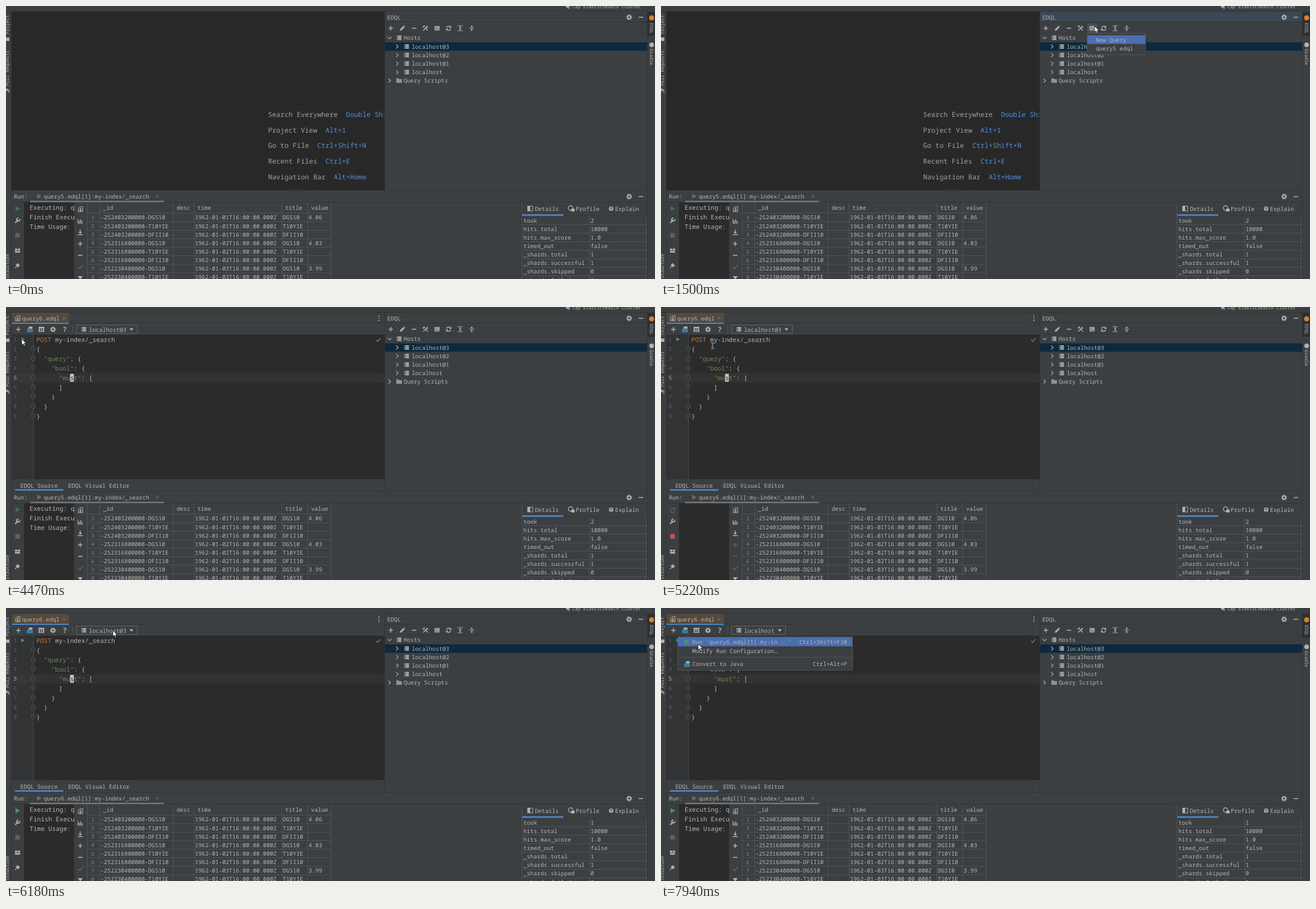
Animation, 1154 px wide and 485 px high, one loop 8000 ms. Source, as an HTML page:

```html
<!DOCTYPE html>
<html lang="en">
<head>
<meta charset="utf-8">
<title>Query console</title>
<style>
html, body { margin: 0; width: 100%; height: 100%; overflow: hidden; background: #3c3f41; }
svg { display: block; }
text { font-family: "Noto Sans Mono", "DejaVu Sans Mono", monospace; text-rendering: geometricPrecision; white-space: pre; }
.layer { animation: 8s step-end infinite; }
#cursor { animation: travel 8s ease-in-out infinite; }
</style>
</head>
<body>
<svg id="stage" width="1154" height="485" viewBox="0 0 1154 485"></svg>
<script>
const LOOP = 8000;
const C = {
  panel: '#3c3f41', edit: '#2b2b2b', line: '#323232', text: '#b4b5b6', icon: '#afb1b3',
  blue: '#4a88c7', pick: '#4b6eaf', grey: '#747a80', green: '#499c54', dim: '#5e6163',
  grid: '#5a5d5f', code: '#a9b7c6', string: '#6a8759', keyword: '#cc7832', link: '#548fe0'
};
const HAIR = .7; // width of table lines
let css = '';

// --- drawing helpers ---
const rect = (x, y, w, h, fill, extra = '') =>
  `<rect x="${x}" y="${y}" width="${w}" height="${h}" fill="${fill}" ${extra}/>`;
const frame = (x, y, w, h, fill, stroke) =>
  rect(x + .5, y + .5, w - 1, h - 1, fill, `stroke="${stroke}"`);
const text = (x, mid, str, fill = C.text, size = 10.1, extra = '') =>
  `<text x="${x}" y="${mid + size * .36}" font-size="${size}" fill="${fill}" ${extra}>${str}</text>`;
const stroke = (d, color = C.icon, width = 1.4) =>
  `<path d="${d}" fill="none" stroke="${color}" stroke-width="${width}"/>`;
const fill = (d, color = C.icon) => `<path d="${d}" fill="${color}"/>`;
const at = (x, y, body) => `<g transform="translate(${x} ${y})">${body}</g>`;
const turned = (x, y, angle, str) =>
  `<text transform="translate(${x} ${y}) rotate(${angle})" font-size="8.1" fill="${C.text}">${str}</text>`;

// Group that is visible only in the given [from, to] spans, in ms.
function layer(id, spans, body) {
  const pct = ms => (ms / LOOP * 100).toFixed(3) + '%';
  const steps = spans[0][0] > 0 ? ['0%{visibility:hidden}'] : [];
  for (const [from, to] of spans) {
    steps.push(`${pct(from)}{visibility:visible}`);
    if (to < LOOP) steps.push(`${pct(to)}{visibility:hidden}`);
  }
  css += `@keyframes ${id}{${steps.join('')}}#${id}{animation-name:${id}}\n`;
  return `<g id="${id}" class="layer">${body}</g>`;
}

// --- icons, centred on 0,0 ---
const icon = {
  plus: (c = C.icon) => stroke('M-4 0H4M0-4V4', c, 1.6),
  minus: (c = C.icon) => stroke('M-4 0H4', c, 1.6),
  play: (c = C.green) => fill('M-3.5-4.5L4.5 0L-3.5 4.5Z', c),
  check: (c = C.dim) => stroke('M-4.5 0L-1.5 3.2L4.5-3.5', c, 1.8),
  close: () => stroke('M-2.5-2.5L2.5 2.5M2.5-2.5L-2.5 2.5', '#7d8083', .9),
  gear: () => `<g fill="none" stroke="${C.icon}"><circle r="2.8" stroke-width="2"/>
    <circle r="4.2" stroke-width="1.8" stroke-dasharray="1.65"/></g>`,
  host: () => rect(-4, -4, 8, 2.3, C.icon) + rect(-4, -1.2, 8, 2.3, C.icon) + rect(-4, 1.6, 8, 2.3, C.icon) +
    stroke('M-2.3-4V4', C.panel, .8),
  right: () => stroke('M-1.7-3.5L1.8 0L-1.7 3.5', C.icon, 1.2),
  down: () => stroke('M-3.5-1.7L0 1.8L3.5-1.7', C.icon, 1.2),
  drop: () => fill('M-3.5-2H3.5L0 2.5Z'),
  folder: () => fill('M-5-4H-1L.5-2.5H5V4H-5Z', '#8e9396'),
  wrench: () => stroke('M-4.2 4.2L1 -1', C.icon, 2.2) + stroke('M3.8-2.8A2.8 2.8 0 1 1 1.5-4.4', C.icon, 1.8),
  tools: () => stroke('M-4 4L3-3M4 4L-1-1', C.icon, 1.7) + stroke('M-4.5-1.5L-1.5-4.5M1.5-3.5L4-1.2', C.icon, 2.3),
  pencil: () => fill('M-4.5 4.5L-4 1.8L1.8-4L4-1.8L-1.8 4Z') + fill('M2.5-4.5L3.3-5L5-3.3L4.5-2.5Z'),
  query: () => rect(-4.5, -4, 9, 8, '#9da2a6') + stroke('M-2.5-2L-.5 0L-2.5 2M.5 2H3', C.panel, 1),
  refresh: () => stroke('M-3.8-1A4 4 0 0 1 3.4-2M3.8 1A4 4 0 0 1-3.4 2', C.icon, 1.5) +
    fill('M4.6-4.5V-.5H.8ZM-4.6 4.5V.5H-.8Z'),
  expand: () => stroke('M-4.5-4.5H4.5M-4.5 4.5H4.5M0-2.5V2.5', C.icon, 1.2) + fill('M-2.3-1L0-3.4L2.3-1ZM-2.3 1L0 3.4L2.3 1Z'),
  collapse: () => stroke('M-4.5 0H4.5M0-5V-2M0 5V2', C.icon, 1.2) + fill('M-2.3-3.5H2.3L0-1ZM-2.3 3.5H2.3L0 1Z'),
  table: () => rect(-5, -4.5, 10, 9, C.icon) +
    stroke('M-4-1.2H4M-4 1.7H4M-1.5-1.5V4M1.5-1.5V4', C.panel, .9),
  file: () => stroke('M-1-4.5H4V4.5H-4V-1.5Z', C.icon, 1) + stroke('M-2.5 0H2.5M-2.5 2.5H2.5M0-3V4', C.icon, 1.1),
  convert: () => rect(-2, -5, 6.5, 4, C.icon) + rect(-5, 0, 10, 5, '#3592c4') + rect(-4, -2, 3, 2, '#3592c4') +
    stroke('M-3 2.5H3', C.panel, 1),
  bars: () => stroke('M-4-3.5V4H4.5', C.icon, 1.2) + stroke('M-1.8 3V-.5M.8 3V-3M3.4 3V0', C.icon, 1.5),
  load: () => stroke('M0-5V1M-4.5 4.3H4.5', C.icon, 1.4) + fill('M-3.2-.8H3.2L0 2.8Z'),
  layout: () => rect(-4.5, -3.5, 4, 3.3, C.icon) + rect(.5, -3.5, 4, 3.3, C.icon) + rect(-4.5, .7, 9, 3, C.icon),
  pin: () => fill('M0-4.5L4.5 0L3 .7L1.2 3.5L-3.5-1.2L-.7-3Z') + stroke('M-1 1L-4.5 4.5', C.icon, 1.3),
  rerun: () => stroke('M3.5-2A4 4 0 1 0 4 1.5', C.dim, 1.5) + fill('M4.8-5V-.5H.5Z', C.dim),
  dots: () => [-4, 0, 4].map(y => `<circle cy="${y}" r="1.1" fill="${C.icon}"/>`).join(''),
  fold: () => `<path d="M-3.2-3.5H3.2V2L0 4.2L-3.2 2Z" fill="${C.edit}" stroke="#606366" stroke-width=".8"/>` +
    stroke('M-1.7 0H1.7', '#707376', .8)
};
const put = (name, x, y, color) => at(x, y, icon[name](color));

// --- window frame ---
function chrome() {
  return rect(0, 0, 1154, 485, C.panel) + rect(0, 9, 1140, 1, C.line) + rect(9, 9, 1, 476, C.line) +
    rect(1140, 9, 1, 476, C.line) + rect(1140, 10, 14, 43, '#2d2f30') +
    rect(996, 0, 6, 3, C.icon) + rect(999, 2, 4, 3, '#3592c4') + text(1007, 1.3, 'Cap Elasticsearch Cluster', C.text, 8.1) +
    turned(5, 50, -90, 'Project') + rect(0, 56, 6, 6, C.icon) +
    turned(5, 142, -90, 'Pull Requests') + stroke('M0 149H5V154M2.5 146.5L0 149L2.5 151.5', C.icon, 1.3) +
    turned(5, 484, -90, 'Structure') +
    '<circle cx="1148" cy="21" r="4.5" fill="#d9822b"/>' + turned(1145, 30, 90, 'EDQL') +
    `<circle cx="1148" cy="69" r="4.2" fill="${C.icon}"/>` + turned(1145, 76, 90, 'Gradle');
}

function welcome() {
  const rows = [['Search Everywhere', 'Double Shift'], ['Project View', 'Alt+1'], ['Go to File', 'Ctrl+Shift+N'],
    ['Recent Files', 'Ctrl+E'], ['Navigation Bar', 'Alt+Home'], ['Drop files here to open', '']];
  return rect(10, 10, 663, 317, '#282828') + rows.map(([name, key], i) => {
    const y = 192.3 + i * 27.9;
    return text(466, y, name, '#a0a2a4', 12.15) + text(466 + (name.length + 2) * 7.29, y, key, C.link, 12.15);
  }).join('');
}

function hosts() {
  const tools = ['plus', 'pencil', 'minus', 'tools', 'query', 'refresh', 'expand', 'collapse'];
  const names = ['localhost@3', 'localhost@2', 'localhost@1', 'localhost'];
  return rect(673, 10, 467, 317, C.panel) + rect(673, 10, 1, 317, C.line) +
    layer('active', [[780, 1600]], rect(674, 10, 466, 18, '#3b4754')) +
    rect(674, 28, 466, 1, C.line) + text(678, 20, 'EDQL') + put('gear', 1108, 20) + put('minus', 1129, 20) +
    layer('toolHover', [[470, 760]], rect(737, 31, 18, 17, '#4c5052', 'rx="2"')) +
    layer('queryHover', [[1130, 1900]], rect(758, 31, 18, 17, '#4c5052', 'rx="2"')) +
    tools.map((name, i) => put(name, 684.3 + i * 20.55, 39.5)).join('') +
    rect(674, 48, 466, 1, '#373a3c') + rect(674, 64.5, 466, 15, '#0d293e') +
    layer('focusRow', [[780, 1400]], rect(674, 64.5, 466, 15, C.pick)) +
    put('down', 682, 56.5) + put('host', 699, 56.5) + text(707, 56.8, 'Hosts') +
    names.map((name, i) => {
      const y = 72 + i * 15.15;
      return put('right', 695.5, y) + put('host', 712.5, y) + text(721.5, y + .3, name);
    }).join('') +
    put('right', 682, 132.5) + put('folder', 699, 132.5) + text(707, 132.8, 'Query Scripts');
}

// --- editor ---
const lineY = n => 57.7 + (n - 1) * 17.02;
const codeX = col => 54 + col * 6.66;

function codeLines() {
  const lines = [[0, ''], [0, '{'], [2, '"query"', ': {'], [4, '"bool"', ': {'], [6, '"must"', ': ['],
    [6, ']'], [4, '}'], [2, '}'], [0, '}']];
  return lines.map(([indent, head, tail = ''], i) => {
    const y = lineY(i + 1);
    const color = tail ? C.string : C.code;
    return text(13.5, y, i + 1, '#606366', 9.6) + (i ? put('fold', 48.5, y) : '') +
      text(codeX(indent), y, head + `<tspan fill="${C.code}">${tail}</tspan>`, color, 11.1);
  }).join('') +
    text(54, lineY(1), `POST<tspan fill="${C.code}"> my-index/_search</tspan>`, C.keyword, 11.1);
}

function currentLine(n) {
  const y = lineY(n) - 8.5;
  return rect(50, y, 623, 17, C.line) + rect(10, y, 39, 17, '#353739');
}
const lineNumber = n => text(13.5, lineY(n), n, '#a4a3a3', 9.6);
const caret = (col, n, letter) => rect(codeX(col), lineY(n) - 7, 6.7, 14, '#c4c6c8') +
  text(codeX(col), lineY(n), letter, C.edit, 11.1);

function combo(width, name) {
  return frame(125, 31.5, width, 16, C.panel, '#646769') + put('host', 138.5, 39.7) +
    text(147.5, 39.9, name) + put('drop', 98 + width - 109 + 125, 39.7);
}

function underlines(color) {
  return rect(10, 28, 102, 2, color) + rect(16, 323.7, 86, 2.8, color);
}

function editor() {
  return rect(10, 10, 663, 317, C.panel) + rect(10, 10, 102, 19, '#54493c') + rect(10, 28, 663, 1, C.line) +
    put('file', 21, 20) + text(28.5, 20.3, 'query6.edql') + put('close', 103.5, 20) + put('dots', 663, 20) +
    put('plus', 22, 39.7) + put('convert', 42.5, 39.7) + put('table', 63, 39.7) + put('gear', 83.5, 39.7) +
    text(101, 39.9, '?', C.icon, 12, 'font-weight="bold"') + rect(118, 33, 1, 14, '#515456') +
    layer('hostThree', [[2460, 6900]], combo(109, 'localhost@3')) +
    layer('hostPlain', [[6900, LOOP]], combo(97, 'localhost')) +
    rect(10, 49, 663, 257, C.edit) + rect(10, 49, 39, 257, '#313335') +
    layer('firstLine', [[2460, 2900]], currentLine(1)) +
    layer('fifthLine', [[2900, LOOP]], currentLine(5)) +
    rect(48.5, 49, HAIR, 257, '#555758') + codeLines() +
    layer('firstNumber', [[2460, 2900]], lineNumber(1)) +
    layer('fifthNumber', [[2900, LOOP]], lineNumber(5)) +
    layer('caretStart', [[2460, 2900]], caret(0, 1, 'P')) +
    layer('caretWord', [[2900, 3420], [3960, 4550], [5130, 5660], [6050, 6220], [6960, 7500]], caret(9, 5, 's')) +
    layer('checked', [[2780, LOOP]], at(30, 57.5, `<g transform="scale(.8)">${icon.play()}</g>`) +
      at(662, 58.5, `<g transform="scale(.85)">${icon.check(C.green)}</g>`)) +
    text(25.5, 317, 'EDQL Source') + text(110.5, 317, 'EDQL Visual Editor') +
    layer('tabFocus', [[2460, 6220], [6900, LOOP]], underlines(C.blue)) +
    layer('tabBlur', [[6220, 6900]], underlines(C.grey));
}

// --- run panel ---
function results() {
  const cols = [144.5, 166.5, 297.5, 334.5, 490.5, 536.5, 578.5];
  const heads = ['_id', 'desc', 'time', 'title', 'value'];
  const kinds = ['DGS10', 'T10YIE', 'DFII10'];
  const values = ['4.06', '4.03', '3.99'];
  let out = heads.map((name, i) => text(cols[i + 1] + 6, 358.2, name)).join('');
  for (let i = 0; i < 8; i++) {
    const y = 375.6 + i * 15.14, day = Math.floor(i / 3), kind = kinds[i % 3];
    out += rect(145, y + 7.2, 434, HAIR, C.grid) + text(151.5, y + .2, i + 1, '#85888a', 9) +
      text(168, y + .2, `${-252403200000 + day * 86400000}-${kind}`) +
      text(336, y + .2, `1962-01-0${day + 1}T16:00:00.000Z`) + text(492, y + .2, kind) +
      (i % 3 ? '' : text(538, y + .2, values[day]));
  }
  return out + rect(145, 367.6, 434, HAIR, C.grid) +
    cols.map(x => rect(x - HAIR / 2, 349, HAIR, 136, C.grid)).join('');
}

function details() {
  const rows = [['took', ''], ['hits.total', '10000'], ['hits.max_score', '1.0'], ['timed_out', 'false'],
    ['_shards.total', '1'], ['_shards.successful', '1'], ['_shards.skipped', '0'], ['_shards.failed', '0']];
  return rect(917, 349, HAIR, 136, C.grid) + frame(927, 355, 10, 9.5, C.panel, C.icon) + rect(928, 356, 4, 8, C.icon) +
    text(940.5, 360.2, 'Details') +
    `<circle cx="1004" cy="359" r="4" fill="none" stroke="${C.icon}" stroke-width="1.3"/>` + rect(1005, 360, 6, 5, C.icon) +
    text(1013, 360.2, 'Profile') + `<circle cx="1076" cy="360" r="4" fill="${C.icon}"/>` +
    stroke('M1073 359H1079M1076 356V364', C.panel, .8) + text(1083, 360.2, 'Explain') +
    rect(918, 372, 222, 1, '#323537') + rect(918, 370, 73, 2.8, C.blue) +
    rows.map(([name, value], i) => {
      const y = 381 + i * 15.14;
      return text(920, y, name) + text(1039.5, y, value) + rect(918, y + 7.2, 221, HAIR, C.grid);
    }).join('') +
    layer('tookTwo', [[0, 5250]], text(1039.5, 381, '2')) +
    layer('tookOne', [[5250, LOOP]], text(1039.5, 381, '1')) +
    rect(1037, 373, HAIR, 112, C.grid) + rect(1138, 373, HAIR, 112, C.grid);
}

function runPanel() {
  const title = n => text(67, 338.5, `query${n}.edql[1]:my-index/_search`);
  const log = ['Executing: query', 'Finish Executing', 'Time Usage: 12 ms'];
  const idle = put('plus', 132, 422.5) + put('minus', 132, 443) + rect(16.5, 403.5, 8, 8, C.dim) +
    `<g clip-path="url(#console)">${log.map((s, i) => text(42, 358 + i * 17.02, s, C.text, 11.1)).join('')}</g>`;
  return rect(10, 327, 1130, 158, C.panel) + rect(10, 327, 1130, 1, C.line) + text(14, 338.5, 'Run:') +
    put('play', 59, 338, '#686c6e') + put('close', 269.5, 338) + rect(10, 348, 1130, 1, C.line) +
    rect(43, 346, 238, 2.5, C.grey) + put('gear', 1108, 338.5) + put('minus', 1129, 338.5) +
    rect(32, 349, 89, 136, C.edit) +
    put('wrench', 20.5, 381) + put('layout', 20.5, 434.5) + put('pin', 20.5, 461) +
    put('file', 132.5, 361) + put('bars', 132, 382) + put('load', 132, 402) + put('check', 132.5, 463.5) +
    fill('M127.5 480H136.5L132 485.5Z') + results() + details() +
    layer('titleOld', [[0, 5170]], title(5) + put('play', 20.5, 360, '#41704a')) +
    layer('titleNew', [[5170, LOOP]], title(6)) +
    layer('idle', [[0, 5170], [5600, LOOP]], idle) +
    layer('running', [[5170, 5600]], put('rerun', 20.5, 361) + rect(16.5, 403.5, 8, 8, '#c75450') +
      put('plus', 132, 422.5, C.dim) + put('minus', 132, 443, C.dim)) +
    layer('done', [[5600, LOOP]], put('play', 20.5, 360));
}

// --- popups ---
function queryMenu() {
  return frame(757.5, 48, 104.5, 39, C.panel, '#555759') + rect(758, 52, 103, 15.5, C.pick) +
    text(773, 60, 'New Query') + text(773, 75.2, 'query5.edql');
}

function hostMenu() {
  const names = ['localhost@3', 'localhost@2', 'localhost@1', 'localhost'];
  const picks = [[6220, 6400], [6400, 6460], [6460, 6520], [6520, 6900]];
  return frame(124.5, 48, 123, 87, C.panel, '#555759') + put('gear', 140.5, 60) + text(152, 60, 'Manage Hosts') +
    rect(125, 69, 121, 1, '#515456') + names.map((name, i) => {
      const y = 77.2 + i * 15.2;
      return layer('pick' + i, [picks[i]], rect(125, y - 7.6, 121, 15.2, C.pick)) +
        put('host', 140.5, y) + text(153, y, name);
    }).join('');
}

function runMenu() {
  return frame(29.5, 50.5, 311.5, 60.5, C.panel, '#555759') +
    layer('runPick', [[4620, 5110], [7760, LOOP]], rect(30, 52, 310, 16, C.pick)) +
    put('play', 46, 60) + text(55.5, 60, "Run 'query6.edql[1]:my-in...'") + text(246, 60, 'Ctrl+Shift+F10') +
    text(55.5, 76.5, 'Modify Run Configuration…') + rect(30, 87, 310, 1, '#515456') +
    put('convert', 46.5, 99.5) + text(55.5, 99.5, 'Convert to Java') + text(270, 99.5, 'Ctrl+Alt+P');
}

// --- pointer: [ms, x, y] ---
const path = [
  [0, 1065, 392], [70, 1065, 392], [540, 746, 40], [740, 746, 40], [830, 754, 70], [960, 754, 70], [1170, 771, 36],
  [1770, 771, 36], [2050, 774, 60], [2320, 774, 60], [2500, 791, 58], [2560, 791, 58], [2860, 117, 125],
  [3130, 117, 125], [3450, 138, 100], [3880, 92, 64], [3940, 92, 64], [4070, 26, 59], [4220, 26, 59], [4330, 28, 57],
  [4520, 28, 57], [4750, 66, 64], [5080, 66, 64], [5330, 108, 72], [5970, 108, 72], [6170, 190, 40], [6300, 190, 40],
  [6590, 191, 118], [6860, 191, 118], [7100, 170, 80], [7540, 29, 57], [7680, 29, 57], [7900, 66, 64], [8000, 66, 64]
];
css += '@keyframes travel{' + path.map(([ms, x, y]) =>
  `${ms / LOOP * 100}%{transform:translate(${x}px,${y}px)}`).join('') + '}\n';

const arrow = '<path d="M0 0V10.5L2.5 8.3L4.3 12.2L6.2 11.3L4.5 7.6H8Z" fill="#fff" stroke="#111" stroke-width=".8"/>';
const beam = stroke('M-2.5-5H-.5L0-4.5L.5-5H2.5M-2.5 5H-.5L0 4.5L.5 5H2.5M0-4.5V4.5', '#d0d0d0', 1);
const pointer = '<g id="cursor">' +
  layer('arrow', [[70, 2620], [4000, 5200], [6060, 6250], [7420, LOOP]], arrow) +
  layer('beam', [[2620, 4000], [5200, 6060], [6250, 7420]], beam) + '</g>';

document.getElementById('stage').innerHTML =
  '<defs><clipPath id="console"><rect x="32" y="349" width="89" height="136"/></clipPath></defs>' +
  chrome() + layer('welcome', [[0, 2460]], welcome()) + layer('editor', [[2460, LOOP]], editor()) +
  hosts() + runPanel() +
  layer('queryMenu', [[1400, 2330]], queryMenu()) +
  layer('hostMenu', [[6220, 6900]], hostMenu()) +
  layer('runMenu', [[4550, 5110], [7690, LOOP]], runMenu()) + pointer;

const style = document.createElement('style');
style.textContent = css;
document.head.append(style);
</script>
</body>
</html>
```
